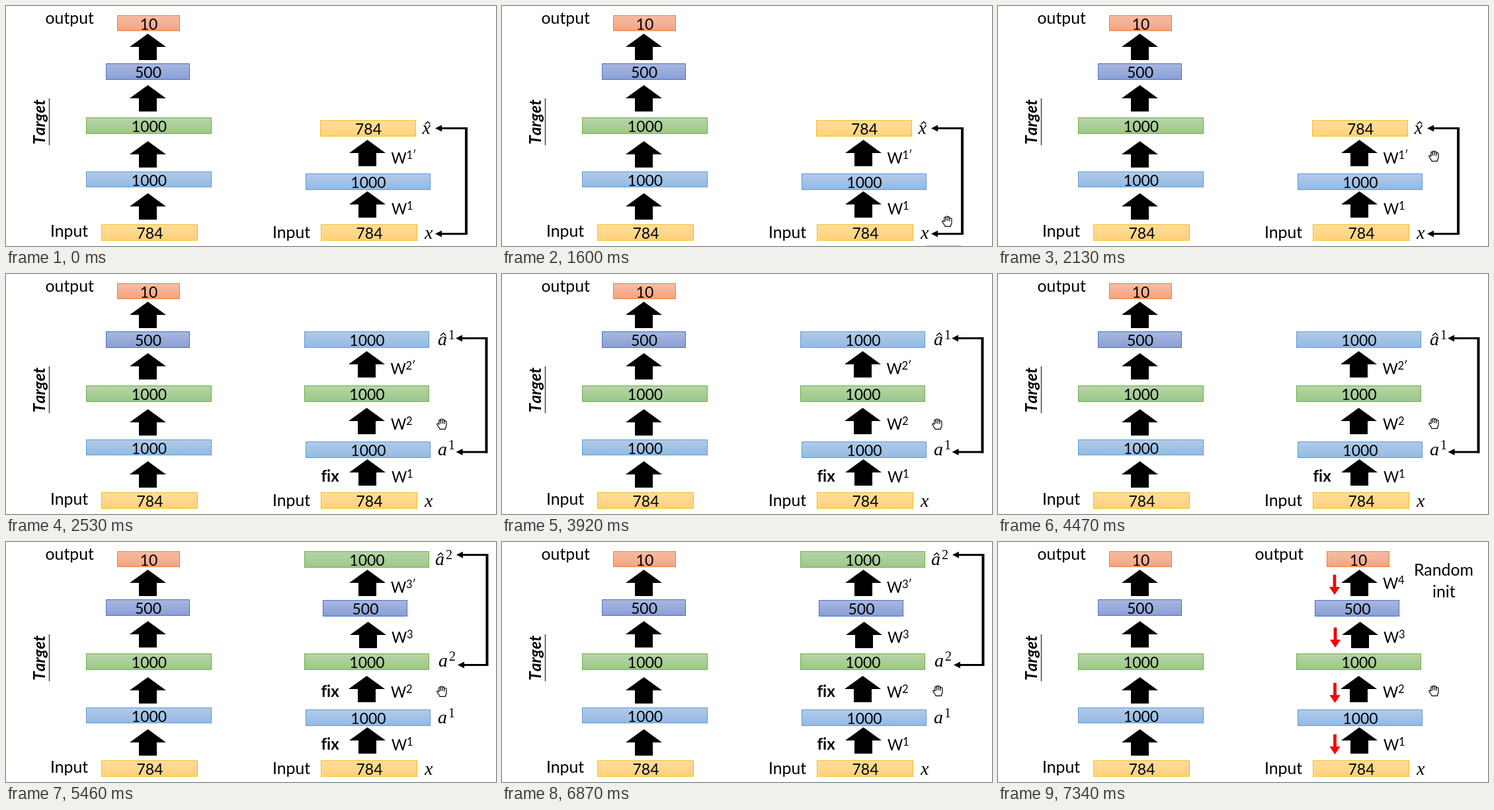
These frames come from a looping animation (741x364 px, 8000 ms). An HTML page:

```html
<!DOCTYPE html>
<html lang="en">
<head>
<meta charset="utf-8">
<title>Layer-wise pre-training</title>
<style>
  html, body { margin: 0; width: 100%; height: 100%; overflow: hidden; background: #fff; }
  svg { display: block; width: 100%; height: 100%; }
  text { font: 24.8px Lato, Carlito, sans-serif; font-variant-ligatures: none; fill: #000; }
  .num { font-size: 23px; text-anchor: middle; }
  .weight { font-size: 22.5px; }
  .sup { font-size: 16.5px; }
  .bold { font-size: 24px; font-weight: 700; }
  .side { font-size: 24.5px; font-weight: 700; font-style: italic; font-kerning: none; }
  .math { font: italic 28px "Liberation Serif", serif; }
  .mathsup { font: 20px "Liberation Serif", serif; }
</style>
</head>
<body>
<svg id="stage" viewBox="0 0 741 364" xmlns="http://www.w3.org/2000/svg"></svg>
<script>
const LOOP = 8000;
const palette = {
  yellow: ['#ffdd9c', '#ffd27a', '#f5bd1f'],
  blue: ['#b1cbe9', '#93b9e3', '#5b9bd5'],
  green: ['#b5d5a7', '#9cc888', '#70ad47'],
  violet: ['#a8b7df', '#899fd6', '#4472c4'],
  orange: ['#f7bda4', '#f4a380', '#ed7d31']
};

const gradients = Object.entries(palette).map(([name, [top, bottom]]) =>
  `<linearGradient id="${name}" x2="0" y2="1"><stop stop-color="${top}"/>
   <stop offset="1" stop-color="${bottom}"/></linearGradient>`).join('');

const label = (x, y, str, cls = '') => `<text x="${x}" y="${y}" class="${cls}">${str}</text>`;

const layer = (color, x, y, w, str, h = 24) =>
  `<rect x="${x + .5}" y="${y + .5}" width="${w}" height="${h}" fill="url(#${color})" stroke="${palette[color][2]}"/>`
  + label(x + w / 2 + 1, y + 21.5, str, 'num');

const arrowUp = (x, y) =>
  `<path d="M${x} ${y}l27.5 20h-14v20h-27v-20h-14z"/>`;

const arrowDown = (x, y) =>
  `<path d="M${x - 2} ${y}h4v18.5h5.5l-7.5 11l-7.5 -11h5.5z" fill="#f00" stroke="#d00000" stroke-width=".7"/>`;

const weight = (x, y, n) => label(x, y, 'W', 'weight') + label(x + 23, y - 7.5, n, 'sup');

const math = (x, y, letter, sup = '', hat = false) =>
  label(x, y, letter, 'math') + label(x + 16, y - 9, sup, 'mathsup')
  + (hat ? `<path d="M${x + 4} ${y - 14.5}l4.5 -4l3.5 4" fill="none" stroke="#000" stroke-width="1.4"/>` : '');

const head = (x, y) => `<path d="M${x} ${y}l10 -5v10z"/>`;

// Bracket joining two compared layers, arrowheads pointing left
const bracket = (x, top, bottom, tipTop, tipBottom) =>
  `<path d="M${tipTop + 8} ${top}H${x}V${bottom}H${tipBottom + 8}" fill="none" stroke="#000" stroke-width="3"/>`
  + `<path d="M${x} ${top - 1.5}V${bottom + 1.5}" stroke="#000" stroke-width="4"/>`
  + head(tipTop, top) + head(tipBottom, bottom);

const fix = y => label(476.5, y, 'fix', 'bold');

// Each part: the stages it belongs to, then its drawing
const parts = [
  ['0123', [
    label(59.5, 27, 'output'), label(67, 350, 'Input'),
    layer('orange', 168, 14, 94, '10', 23), layer('violet', 151, 87, 126, '500'),
    layer('green', 121, 169, 189, '1000'), layer('blue', 121, 251, 189, '1000', 23),
    layer('yellow', 144, 331, 145, '784'),
    [42, 120, 205, 284].map(y => arrowUp(214.5, y)).join(''),
    `<g transform="translate(59 210) rotate(-90)">${label(0, 0, 'Target', 'side')}</g>`,
    '<path d="M65.5 140V211" stroke="#44563f" stroke-width="1.6"/>',
    label(403, 352, 'Input'), layer('yellow', 476, 331, 145, '784'),
    arrowUp(546.5, 281), weight(583, 316, '1'),
    layer('blue', 453, 254, 188, '1000'), math(633, 353, 'x')
  ]],
  ['0', [
    arrowUp(546.5, 203), weight(582.5, 239, '1′'),
    layer('yellow', 475, 173, 144, '784'),
    math(629.5, 194, 'x', '', true), bracket(696, 185.5, 345.5, 649, 649)
  ]],
  ['123', [
    arrowUp(545.5, 203), weight(582, 236, '2'), layer('green', 451, 169, 188, '1000')
  ]],
  ['12', [fix(315), math(653, 275, 'a', '1')]],
  ['1', [
    arrowUp(545.5, 117), weight(581.5, 152, '2′'), layer('blue', 451, 87, 188, '1000'),
    math(653, 108, 'a', '1', true), bracket(726.5, 97.5, 270, 680, 680.5)
  ]],
  ['23', [
    arrowUp(547.5, 121), weight(583, 153, '3'),
    layer('violet', 479, 88, 127, '500'), arrowUp(546.5, 42)
  ]],
  ['2', [
    fix(235), weight(582, 77, '3′'), layer('green', 451, 14, 188, '1000'),
    math(649, 35, 'a', '2', true), math(654, 189, 'a', '2'),
    bracket(727.5, 19.5, 186.5, 681, 683)
  ]],
  ['3', [
    label(388.5, 27, 'output'), layer('orange', 497, 14, 94, '10', 23), weight(582, 71, '4'),
    label(629, 51, 'Random'), label(657, 83.5, 'init'),
    arrowDown(509, 50), arrowDown(510, 130), arrowDown(509.5, 214), arrowDown(509.5, 292)
  ]]
];

const hand = `<g id="hand" fill="#fff" stroke="#000" stroke-width="1.2" stroke-linejoin="round">
  <path d="M5 16.4C4.6 13.5 1 11.2 .7 9C.8 7.3 2.5 7.5 3.8 9.2V3.2C3.9 1.6 6 1.6 6.2 3.2V2
  C6.4 .3 8.8 .3 9 2V2.6C9.3 1.1 11.6 1.3 11.8 3V4.4C12.2 3 14.9 3.3 15 5V10.5
  C15 13 13.4 14 13.2 16.4Z"/>
  <path d="M6.2 3V8M9 2.6V8M11.8 4V8.4" fill="none"/></g>`;

const busy = `<g id="busy" fill="none"><circle cx="660" cy="228" r="9" stroke="#2a8fc8" stroke-width="5"/>
  <circle cx="660" cy="228" r="9" stroke="#8fdcf5" stroke-width="2"/></g>`;

const stage = document.getElementById('stage');
stage.innerHTML = `<defs>${gradients}</defs>`
  + parts.map(([, shapes]) => `<g class="part">${shapes.join('')}</g>`).join('')
  + '<path id="edge" d="M641 363.5H694" stroke="#c8c8c8"/>' + hand + busy;

const groups = [...stage.querySelectorAll('.part')];
const find = id => document.getElementById(id);
const [handEl, busyEl, edgeEl] = ['hand', 'busy', 'edge'].map(find);

const stageStarts = [0, 2530, 5460, 7340];
const handSteps = [
  [1600, 665, 318], [1675, 656, 259], [1750, 651, 219],
  [3920, 650, 219], [3990, 651, 219], [4470, 651, 218], [6870, 651, 217]
];

const show = (el, on) => { el.style.display = on ? '' : 'none'; };

function draw(t) {
  const current = String(stageStarts.filter(start => start <= t).length - 1);
  groups.forEach((g, i) => show(g, parts[i][0].includes(current)));

  const waiting = t >= 1990 && t < 2130;
  const step = handSteps.filter(([start]) => start <= t).pop();
  show(handEl, step && !waiting);
  if (step) handEl.setAttribute('transform', `translate(${step[1]} ${step[2]})`);
  show(busyEl, waiting);
  show(edgeEl, t >= 500 && t < 1990);
}

const origin = performance.now();
function tick(now) {
  draw(Math.max(0, now - origin) % LOOP);
  requestAnimationFrame(tick);
}
draw(0);
requestAnimationFrame(tick);
</script>
</body>
</html>
```
